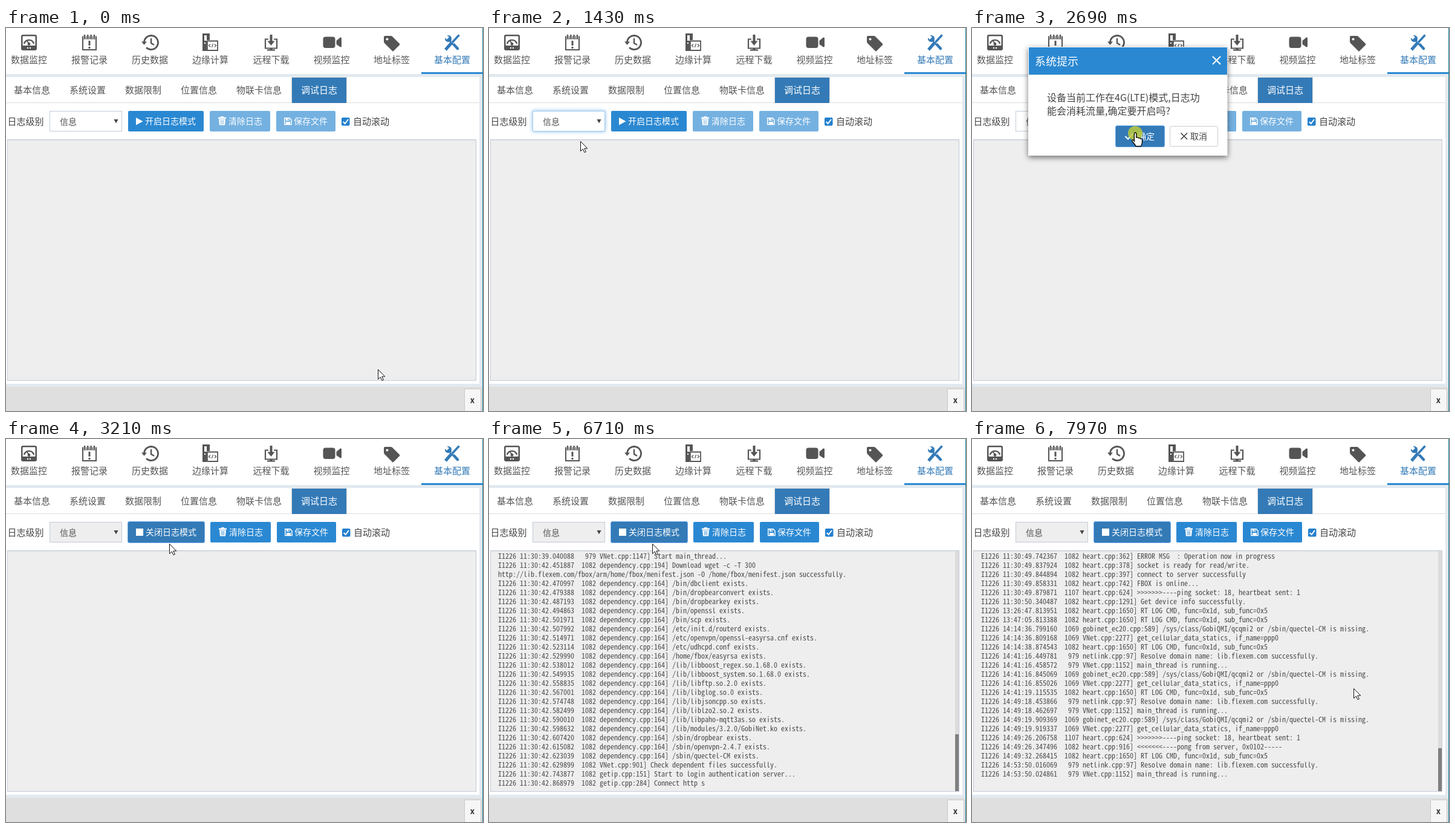
An HTML page that plays this animation: 789 by 633 pixels, repeating every 8000 ms.

```html
<!DOCTYPE html>
<html lang="zh">
<head>
<meta charset="utf-8">
<style>
  html, body { margin: 0; width: 100%; height: 100%; overflow: hidden; background: #fff; }
  #stage { position: relative; width: 789px; height: 633px; overflow: hidden; }
  svg { position: absolute; left: 0; top: 0; font-family: "Noto Sans CJK SC", "Noto Sans CJK", sans-serif; }
  #log { position: absolute; left: 3px; top: 185px; width: 774px; height: 397px; overflow: hidden; }
  pre {
    position: absolute; left: 12px; margin: 0; color: #4a4a4a;
    font: 12px/15px "Noto Sans Mono CJK SC", "Liberation Mono", monospace;
    font-variant-ligatures: none;
  }
  #track { position: absolute; right: 0; top: 0; width: 6px; height: 397px; background: #dcdcdc; }
  #thumb { position: absolute; bottom: 0; width: 6px; background: #808080; }
  .focus { stroke: #a3cbee; filter: drop-shadow(0 0 3px #7db8ea); }
  #dialog { filter: drop-shadow(0 3px 5px rgba(0, 0, 0, .55)); }
</style>
</head>
<body>
<div id="stage">
  <svg id="page" width="789" height="633"></svg>
  <div id="log"><pre></pre><div id="track"><div id="thumb"></div></div></div>
  <svg id="over" width="789" height="633"></svg>
</div>
<script>
const LOOP = 8000, BLUE = '#2a88d2', DARK = '#337ab7', GREY = '#555';
const $ = id => document.getElementById(id);

const rect = (x, y, w, h, fill, more = '') =>
  `<rect x="${x}" y="${y}" width="${w}" height="${h}" fill="${fill}" ${more}/>`;
const line = (d, color, width, more = '') =>
  `<path d="${d}" fill="none" stroke="${color}" stroke-width="${width}" ${more}/>`;
const shape = (d, fill, more = '') => `<path d="${d}" fill="${fill}" ${more}/>`;
const dot = (x, y, r, fill, more = '') => `<circle cx="${x}" cy="${y}" r="${r}" fill="${fill}" ${more}/>`;
// cy is the middle of the glyph box
const text = (x, cy, size, str, fill = GREY, more = '') =>
  `<text x="${x}" y="${cy + size * .38}" font-size="${size}" fill="${fill}" ${more}>${str}</text>`;
const box = (x, y, w, h, fill, stroke, more = '') =>
  rect(x + .5, y + .5, w - 1, h - 1, fill, `stroke="${stroke}" ${more}`);

// ---- static page ----
const icons = [
  rect(25, 11, 26, 26, GREY, 'rx="3"') + rect(27.5, 13.5, 21, 15.5, '#fff', 'rx="1"') +
    line('M30 26A8.3 8.3 0 0 1 46 26', GREY, 2.4) + line('M38 26L34 20', GREY, 2) +
    dot(38, 26.5, 2.4, GREY) + dot(36, 33, 1.2, '#fff') + dot(40, 33, 1.2, '#fff'),
  line('M127 14.5H149V36H127Z', GREY, 2) + line('M126 17H150', GREY, 3) +
    [130, 135.3, 140.6, 146].map(x => line(`M${x} 10.5V18`, '#fff', 4) + line(`M${x} 11V18`, GREY, 2.4)).join('') +
    line('M138 21V29', GREY, 3) + dot(138, 32.5, 1.7, GREY),
  line('M228.5 24A11.5 11.5 0 1 1 232 32.3', GREY, 2.8) + shape('M224 22.5H233L228.5 28Z', GREY) +
    line('M240 17V25L245 28', GREY, 2.4),
  rect(325, 9, 12, 29, GREY) + rect(328, 12, 4, 9, '#fff') + rect(328, 24, 2, 2, '#fff') +
    rect(332, 20, 19, 18, '#fff') + line('M333 21.5H350V37H333Z', GREY, 1.8) +
    line('M338 26.5L335.5 29L338 31.5M345 26.5L347.5 29L345 31.5M342.6 26L340.4 32', GREY, 1.2),
  line('M434 18.5H429V33.5H448V18.5H443', GREY, 2.2) + line('M438.5 11V23', GREY, 4) +
    shape('M432.5 21.5H444.5L438.5 29Z', GREY) + line('M432 36.5H445', GREY, 2.2) + line('M438.5 33V37', GREY, 4),
  rect(524.5, 14.5, 20, 18.5, GREY, 'rx="4"') + shape('M546.5 21L553 15.5Q555 15 555 17V30Q555 32 553 31.5L546.5 27Z', GREY),
  shape('M627 13H636Q638 13 639 14L651 26Q652 27 651 28L641 38Q640 39 639 38L626 25Q625 24 625 22V15Q625 13 627 13Z', GREY) +
    dot(630.5, 18.5, 2, '#fff'),
  line('M732 18L747 34', DARK, 4.5, 'stroke-linecap="round"') + dot(731.5, 17.5, 5.5, DARK) +
    shape('M725 9L733 15L729 19L723 13Z', '#fff') + line('M750 11.5L738 24', '#fff', 6) +
    line('M749.5 11.5L738 24', DARK, 3.4) + line('M736.5 25L727 36', DARK, 5)
];
const nav = ['数据监控', '报警记录', '历史数据', '边缘计算', '远程下载', '视频监控', '地址标签', '基本配置'];
const tabs = [[13, '基本信息'], [105, '系统设置'], [197, '数据限制'], [289, '位置信息'], [381, '物联卡信息']];

const trash = x => rect(x, 147.5, 13, 2.4, '#fff') + rect(x + 4, 146, 5, 2, '#fff') +
  shape(`M${x + 1} 150.5H${x + 12}L${x + 11} 160.5H${x + 2}Z`, '#fff') +
  line(`M${x + 4.5} 152V159M${x + 6.5} 152V159M${x + 8.5} 152V159`, BLUE, .8);
const disk = x => line(`M${x + .8} 148.8H${x + 9}L${x + 12} 151.8V159.5H${x + .8}Z`, '#fff', 1.5) +
  rect(x + 3, 149, 5.5, 4, '#fff') + rect(x + 3, 155, 7, 4.5, '#fff') + rect(x + 6, 149.5, 1.5, 2.5, BLUE);

$('page').innerHTML =
  rect(0, 0, 789, 633, '#fff') +
  icons.join('') +
  nav.map((s, i) => text(38 + i * 100 + (i > 3 && i < 6 ? .6 : 0), 52.5, 15, s, i == 7 ? DARK : GREY, 'text-anchor="middle"')).join('') +
  rect(0, 76, 788, 5, '#e2e9ef') + rect(687, 73, 101, 3, BLUE) +
  rect(0, 123, 783, 1, '#ddd') +
  tabs.map(([x, s]) => text(x, 102.5, 15, s)).join('') +
  box(472, 81, 92, 43, DARK, '#ddd') + rect(473, 82, 90, 42, DARK) +
  text(488, 102.5, 15, '调试日志', '#fff', 'font-weight="500"') +
  text(2.5, 154.5, 15, '日志级别', '#444') +
  box(72, 137, 120, 34, '#fff', '#c2cad8', 'id="select"') +
  text(89, 154.5, 14, '信息') + shape('M178.5 151H185.5L182 157.5Z', '#444') +
  `<g id="start">${rect(202, 137, 125, 34, BLUE, 'rx="2" id="startBg"')}${shape('M215 148L226.5 154.2L215 160.5Z', '#fff')}${text(230, 154, 14, '开启日志模式', '#fff')}</g>` +
  `<g id="stop">${box(201, 136, 128, 36, DARK, '#6ea8ec', 'rx="2.5"')}${rect(215, 148, 12, 12, '#fff')}${text(231, 154, 14, '关闭日志模式', '#fff')}</g>` +
  `<g id="tools"><g id="actions">${rect(337, 137, 100, 34, BLUE, 'rx="2"')}${trash(351)}${text(368, 154, 14, '清除日志', '#fff', 'font-weight="500"')}` +
  `${rect(447, 137, 98, 34, BLUE, 'rx="2"')}${disk(460)}${text(476, 154, 14, '保存文件', '#fff', 'font-weight="500"')}</g>` +
  rect(555, 148, 13.5, 13.5, '#2380cf', 'rx="2"') + line('M557.7 155L560.7 158L566 151', '#fff', 2) +
  text(574, 154.5, 15, '自动滚动', '#444') + '</g>' +
  box(2, 184, 776, 399, '#eee', '#c2cad8') + rect(3, 185, 774, 1, 'rgba(0,0,0,.06)') +
  rect(783, 81, 5, 507, '#e2e9ef') + rect(0, 588, 788, 5, '#e2e9ef') +
  rect(0, 593, 788, 40, '#dfdfdf') + box(758, 596, 28, 40, '#f6f6f6', '#c8c8c8', 'rx="2"') +
  `<text x="771.5" y="620" font-size="13" font-weight="700" fill="#333" text-anchor="middle">x</text>` +
  rect(788, 0, 1, 633, '#1b86a3');

// ---- overlays ----
const arrow = 'M.5 .5V16.5L4.3 13L7 18.7L9.4 17.6L6.8 12H11.8Z';
const hand = 'M-1.6 12.5V1.6Q-1.6 0 0 0T1.7 1.6V8Q4.5 7 5.2 9Q7.5 8 8.3 10Q11.5 9.5 11.5 12V16Q11.5 19 9.5 22.5H1Q0 19.5-5 14.5Q-6 12.5-4 12Q-2.8 12-1.6 14Z';

$('over').innerHTML =
  `<g id="menu">${box(72, 171, 120, 82, '#fff', '#9aa3b0')}${rect(73, 172, 118, 20, '#1e90ff')}` +
  ['信息', '警告', '错误', '致命'].map((s, i) => text(89, 182 + i * 20, 14, s, i ? GREY : '#fff')).join('') + '</g>' +
  `<g id="dialog">${rect(93, 31, 329.5, 180, '#fff')}${rect(94, 32, 328, 45, BLUE)}` +
  text(104, 55, 18, '系统提示', '#fff') + line('M398 47L411 60M411 47L398 60', '#fff', 2.2) +
  rect(94, 77, 328, 1, '#e5e5e5') +
  text(124, 114.5, 16, '设备当前工作在4G(LTE)模式,日志功', '#444') + text(124, 137, 16, '能会消耗流量,确定要开启吗?', '#444') +
  box(237, 161, 82, 36, DARK, '#6ea8ec', 'rx="2.5"') + line('M253.5 179L258 183.5L267 174', '#fff', 2.2) + text(274, 179, 14, '确定', '#fff') +
  box(327, 162, 80, 34, '#fff', '#ccc', 'rx="2"') + line('M345.5 173.5L356 184M356 173.5L345.5 184', '#444', 1.7) + text(361, 179, 14, '取消', '#444') +
  '</g>' +
  dot(0, 0, 12, '#bcc93c', 'id="ripple" opacity=".85"') +
  `<g id="cursor">${shape(arrow, '#fff', 'id="arrow" stroke="#111"')}${shape(hand, '#fff', 'id="hand" stroke="#000" stroke-width="1.3"')}</g>`;

// ---- log text ----
const stamp = (time, id, rest) => `I1226 ${time} ${String(id).padStart(5)} ${rest}`;
const first = `Log file created at: 2019/12/26 11:30:12
Running on machine: uclibc
Log line format: [IWEF]mmdd hh:mm:ss.uuuuuu threadid file:line] msg
I1226 11:30:12.481885   964 vpn_client.cpp:617] StartGenerate_PKI
E1226 11:30:12.498987   978 util.cpp:505] RF LED GPIO22 does not exist
I1226 11:30:12.522620   964 vpn_client.cpp:437] StartCheckVpnConfig
I1226 11:30:12.562023   964 vpn_client.cpp:407] StartVpnReportThread
I1226 11:30:12.563771   992 vpn_client.cpp:519] CheckVpnConfig
I1226 11:30:12.596019   995 vpn_client.cpp:418] ReportVpnStatus
I1226 11:30:12.655053  1000 box_tcp_to_com.cpp:1347] Enter tcp_to_tcp_read_plc
I1226 11:30:12.715402   979 VNet.cpp:984] version(fcs.fds.floader): 1054.2230.1054
I1226 11:30:12.723181   979 data_trans.cpp:317] Detect new device from /home/fbox/PortIndex
I1226 11:30:12.731740   979 data_trans.cpp:343] Device number is 3
I1226 11:30:12.738049   979 data_trans.cpp:424] port: 4098
I1226 11:30:12.743566   979 data_trans.cpp:425] order:0
I1226 11:30:12.748991   979 data_trans.cpp:424] port: 4099`.split('\n');

const ports = Array.from({ length: 70 }, (_, i) => stamp(
  '11:30:' + (12.754483 + i * .005517).toFixed(6), 979,
  i % 2 ? `data_trans.cpp:424] port: ${4100 + (i >> 1)}` : `data_trans.cpp:425] order:${1 + (i >> 1)}`));

const files = `470997 /bin/dbclient|479388 /bin/dropbearconvert|487193 /bin/dropbearkey|494863 /bin/openssl|501971 /bin/scp|507992 /etc/init.d/routerd|514971 /etc/openvpn/openssl-easyrsa.cnf|523114 /etc/udhcpd.conf|529990 /home/fbox/easyrsa|538012 /lib/libboost_regex.so.1.68.0|549935 /lib/libboost_system.so.1.68.0|558835 /lib/libftp.so.2.0|567001 /lib/libglog.so.0|574748 /lib/libjsoncpp.so|582499 /lib/liblzo2.so.2|590010 /lib/libpaho-mqtt3as.so|598632 /lib/modules/3.2.0/GobiNet.ko|607420 /sbin/dropbear|615082 /sbin/openvpn-2.4.7|623039 /sbin/quectel-CM`
  .split('|').map(s => s.split(' ')).map(([us, path]) => stamp('11:30:42.' + us, 1082, `dependency.cpp:164] ${path} exists.`));

// rows of "time id message"
const block = rows => rows.split('\n').map(r => {
  const [, time, id, msg] = r.match(/^(\S+) (\d+) (.*)$/);
  return stamp(time, id, msg);
});
const login = block(`11:30:42.629899 1082 VNet.cpp:901] Check dependent files successfully.
11:30:42.743877 1082 getip.cpp:151] Start to login authentication server...
11:30:42.868979 1082 getip.cpp:284] Connect http server successfully.
11:30:43.912406 1082 getip.cpp:302] Send login request.
11:30:44.350118 1082 getip.cpp:331] Receive login response.
11:30:44.358720 1082 getip.cpp:347] Login successfully.
11:30:44.367215 1082 getip.cpp:365] Get server address.
11:30:45.120833 1082 heart.cpp:210] Start heartbeat thread.
11:30:45.129470 1082 heart.cpp:233] Create socket.
11:30:45.137902 1082 heart.cpp:251] Set socket option.
11:30:46.204417 1082 heart.cpp:280] Resolve server address.
11:30:48.630925 1082 heart.cpp:305] Resolve successfully.
11:30:48.639218 1082 heart.cpp:327] Set socket nonblock.
11:30:49.733906 1082 heart.cpp:344] Connect to server...`);

const RT = '1082 heart.cpp:1650] RT LOG CMD, func=0x1d, sub_func=0x5';
const GOBI = '1069 gobinet_ec20.cpp:589] /sys/class/GobiQMI/qcqmi2 or /sbin/quectel-CM is missing.';
const CELL = '1069 VNet.cpp:2277] get_cellular_data_statics, if_name=ppp0';
const DNS = '979 netlink.cpp:97] Resolve domain name: lib.flexem.com successfully.';
const RUN = '979 VNet.cpp:1152] main_thread is running...';
const PING = '1107 heart.cpp:624] >>>>>>>----ping socket: 18, heartbeat sent: 1';
const last = block(`11:30:49.837924 1082 heart.cpp:378] socket is ready for read/write.
11:30:49.844894 1082 heart.cpp:397] connect to server successfully
11:30:49.858331 1082 heart.cpp:742] FBOX is online...
11:30:49.879871 ${PING}
11:30:50.340487 1082 heart.cpp:1291] Get device info successfully.
13:26:47.813951 ${RT}
13:47:05.813388 ${RT}
14:14:36.799160 ${GOBI}
14:14:36.809168 ${CELL}
14:14:38.874543 ${RT}
14:41:16.449781 ${DNS}
14:41:16.458572 ${RUN}
14:41:16.845069 ${GOBI}
14:41:16.855026 ${CELL}
14:41:19.115535 ${RT}
14:49:18.453866 ${DNS}
14:49:18.462697 ${RUN}
14:49:19.909369 ${GOBI}
14:49:19.919337 ${CELL}
14:49:26.206758 ${PING}
14:49:26.347496 1082 heart.cpp:916] <<<<<<<----pong from server, 0x0102-----
14:49:32.268415 ${RT}
14:53:50.016069 ${DNS}
14:53:50.024861 ${RUN}`);

const lines = [
  ...first, ...ports,
  stamp('11:30:39.040088', 979, 'VNet.cpp:1147] Start main_thread...'),
  stamp('11:30:42.451887', 1082, 'dependency.cpp:194] Download wget -c -T 300'),
  'http://lib.flexem.com/fbox/arm/home/fbox/menifest.json -O /home/fbox/menifest.json successfully.',
  ...files, ...login,
  'E1226 11:30:49.742367  1082 heart.cpp:362] ERROR MSG  : Operation now in progress',
  ...last, ''
];

// ---- timeline ----
// time, visible lines, characters still missing from the last one
const chunks = [[0, 0, 0], [6250, 16, 7], [6420, 48, 0], [6570, 80, 0], [6710, 112, 19],
  [6790, 124, 0], [6860, 136, 0], [6940, lines.length, 0]];
// first step, last step, number of steps, from, to
const moves = [
  [70, 678, 9, [615, 564], [181, 155]],
  [910, 970, 2, [181, 155], [151, 187]],
  [1600, 1831, 4, [151, 187], [270, 152]],
  [2530, 2690, 3, [270, 152], [270, 173]],
  [7810, 7970, 3, [270, 173], [631, 412]]
];
const clicks = [[754, 830], [1370, 1430], [1909, 1986], [2690, 2840]];

const within = (t, a, b) => t >= a && t < b;
const show = (id, on) => $(id).style.display = on ? '' : 'none';

function cursorAt(t) {
  let pos = moves[0][3];
  for (const [a, b, n, from, to] of moves) {
    if (t < a) break;
    const k = Math.min(1, (Math.floor((t - a) / (b - a) * (n - 1) + 1e-6) + 1) / n);
    const e = k * k * (3 - 2 * k);
    pos = from.map((v, i) => Math.round(v + (to[i] - v) * e));
  }
  return pos;
}

function dialogOpacity(t) {
  if (t < 1986 || t >= 2990) return 0;
  if (t < 2140) return t < 2063 ? .35 : .7;
  return t < 2840 ? 1 : t < 2915 ? .65 : .3;
}

const pre = document.querySelector('pre');
let shown = -1;
function drawLog(t) {
  const [, n, cut] = chunks.filter(c => c[0] <= t).pop();
  if (n === shown) return;
  shown = n;
  const str = lines.slice(Math.max(0, n - 26), n).join('\n');
  pre.textContent = str.slice(0, str.length - cut);
  pre.style.top = (n > 26 ? 0 : 5) + 'px';
  show('track', n > 26);
  $('thumb').style.height = Math.round(397 * 397 / (n * 15)) + 'px';
}

function draw(t) {
  const [x, y] = cursorAt(t);
  const running = t >= 3150;
  const pointing = within(t, 1754, 2140) || within(t, 2610, 2915);
  $('cursor').setAttribute('transform', `translate(${x} ${y})`);
  show('hand', pointing);
  show('arrow', !pointing);

  show('ripple', clicks.some(([a, b]) => within(t, a, b)));
  $('ripple').setAttribute('transform', `translate(${x} ${y + 1})`);

  $('select').setAttribute('class', within(t, 754, 1909) ? 'focus' : '');
  $('select').setAttribute('fill', running ? '#eee' : '#fff');
  $('startBg').setAttribute('fill', within(t, 1754, 2990) ? DARK : BLUE);
  show('start', !running);
  show('stop', running);
  $('actions').setAttribute('opacity', running ? 1 : .65);
  $('tools').setAttribute('transform', `translate(${running ? 1 : 0} 0)`);

  show('menu', within(t, 830, 1430));
  const o = dialogOpacity(t);
  show('dialog', o > 0);
  $('dialog').style.opacity = o;
  drawLog(t);
}

const t0 = performance.now();
function tick() {
  draw((performance.now() - t0) % LOOP);
  requestAnimationFrame(tick);
}
tick();
</script>
</body>
</html>
```
